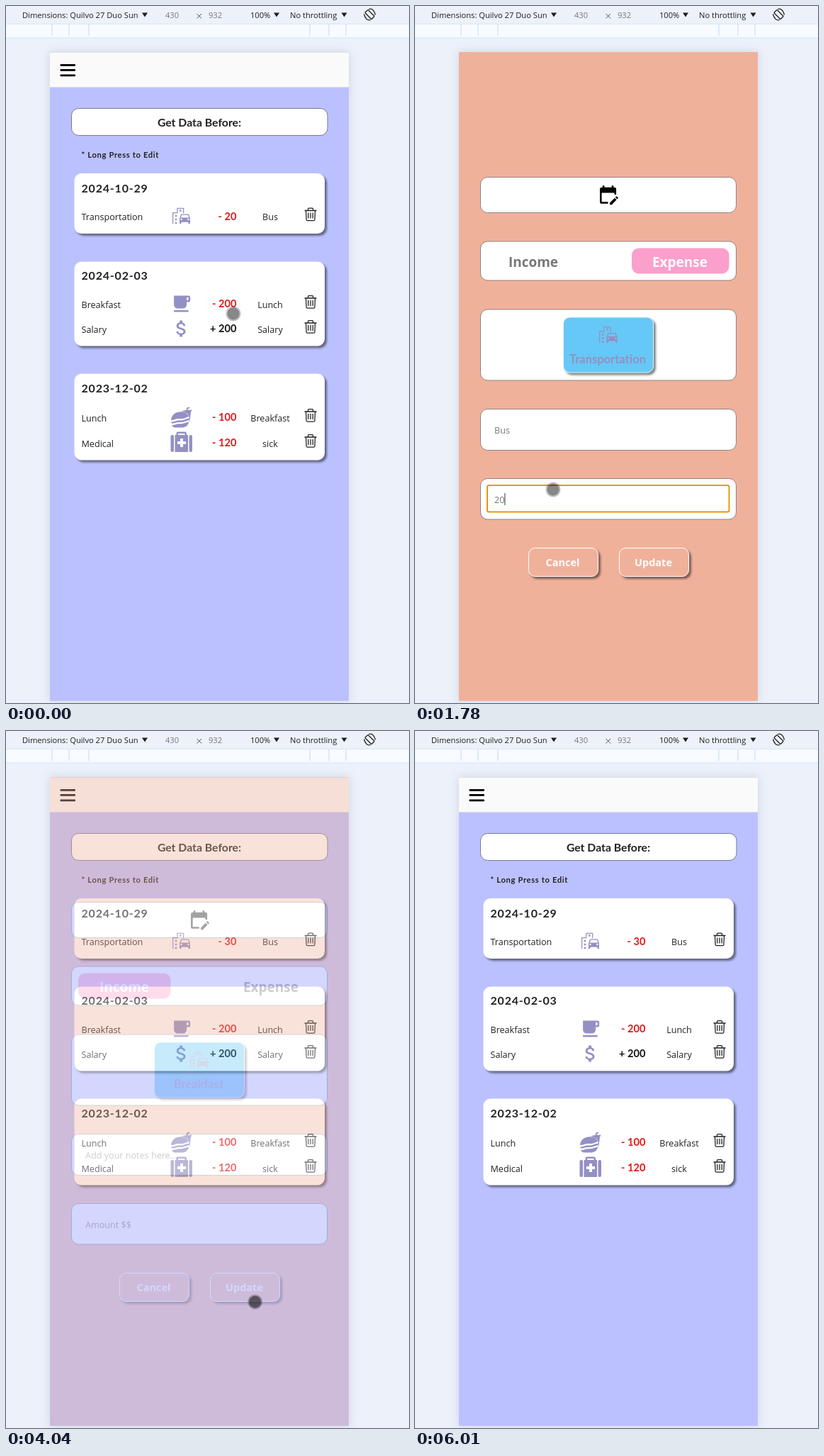
Animation of 569 by 983 pixels, one loop 6230 ms. Source, as an HTML page:

```html
<!DOCTYPE html>
<html lang="en">
<head>
<meta charset="utf-8">
<title>Expense list</title>
<style>
html, body { margin: 0; width: 100%; height: 100%; overflow: hidden; background: #ecf1fa; }
svg { display: block; width: 100vw; height: 100vh; }
text { font-family: "Open Sans", "Noto Sans", sans-serif; font-size: 12.6px; fill: #222; white-space: pre; }
.bar { font-size: 11.15px; fill: #1f1f1f; }
.dim { fill: #777; }
.date, .amt, .head, .hint, .tile { font-family: Lato, sans-serif; font-weight: 700; }
.date { font-size: 16px; letter-spacing: .8px; }
.amt { font-size: 14.6px; text-anchor: end; }
.head { font-size: 15.8px; text-anchor: middle; }
.hint { font-size: 11.2px; letter-spacing: .65px; }
.tile { font-size: 16.5px; fill: #9390c3; text-anchor: middle; }
.mid { text-anchor: middle; }
.big, .btn { font-weight: 700; text-anchor: middle; }
.big { font-size: 19px; fill: #777; }
.btn { font-size: 14.5px; fill: #fff; }
.icon { fill: #9390c3; }
.line { fill: none; stroke: #222; stroke-width: 1.3; }
.lift { filter: drop-shadow(3px 3px 1.5px rgba(0,0,0,.48)); }
</style>
</head>
<body>
<svg id="stage" viewBox="0 0 569 983" preserveAspectRatio="none"></svg>
<script>
const LOOP = 6230;
const $ = id => document.getElementById(id);

// ---------- drawing helpers ----------
const text = (x, y, s, cls = '', extra = '') => `<text x="${x}" y="${y}" class="${cls}" ${extra}>${s}</text>`;
const rect = (x, y, w, h, fill, r = 0, extra = '') =>
  `<rect x="${x}" y="${y}" width="${w}" height="${h}" rx="${r}" fill="${fill}" ${extra}/>`;
const field = (y, h) => rect(92.5, y + .5, 361, h, '#fff', 10, 'stroke="#8b8582"');
const card = (y, h) => rect(96.5, y, 353.5, h, '#fff', 10, 'class="lift"');
const icon = (x, y, d, scale = 1.28, extra = 'class="icon"') =>
  `<path transform="translate(${x} ${y}) scale(${scale})" d="${d}" ${extra}/>`;
const arrow = x => `<path d="M${x - 4} 9.5h8l-4 6z" fill="#1f1f1f"/>`;

const TRANSPORT = 'M20.57 10.66C20.43 10.26 20.05 10 19.6 10h-7.19c-.46 0-.83.26-.98.66L10 14.77v5.51c0 .38.31.72.69.72h.62c.38 0 .69-.38.69-.76V19h8v1.24c0 .38.31.76.69.76h.61c.38 0 .7-.34.7-.72v-5.51zM12.4 11h7.2l1 3h-9.2zM12 17a1 1 0 1 1 0-2 1 1 0 0 1 0 2zm8 0a1 1 0 1 1 0-2 1 1 0 0 1 0 2zM14 9h1V3H7v5H2v13h1V9h5V4h6zM5 11h2v2H5zM10 5h2v2h-2zM5 15h2v2H5zM5 19h2v2H5z';
const CUP = 'M20 3H4v10a4 4 0 0 0 4 4h6a4 4 0 0 0 4-4v-3h2a2 2 0 0 0 2-2V5a2 2 0 0 0-2-2zm0 5h-2V5h2zM4 19h16v2H4z';
const DOLLAR = 'M11.8 10.9c-2.27-.59-3-1.2-3-2.15 0-1.09 1.01-1.85 2.7-1.85 1.78 0 2.44.85 2.5 2.1h2.21c-.07-1.72-1.12-3.3-3.21-3.81V3h-3v2.16c-1.94.42-3.5 1.68-3.5 3.61 0 2.31 1.91 3.46 4.7 4.13 2.5.6 3 1.48 3 2.41 0 .69-.49 1.79-2.7 1.79-2.06 0-2.87-.92-2.98-2.1h-2.2c.12 2.19 1.76 3.42 3.68 3.83V21h3v-2.15c1.95-.37 3.5-1.5 3.5-3.55 0-2.84-2.43-3.81-4.7-4.4z';
const CALENDAR = 'M12 22H5a2 2 0 0 1-2-2V6c0-1.1.9-2 2-2h1V2h2v2h8V2h2v2h1a2 2 0 0 1 2 2v6h-2v-2H5v10h7zm10.1-5 .7-.7c.4-.4.4-1 0-1.4l-.7-.7c-.4-.4-1-.4-1.4 0l-.7.7 2.1 2.1zm-.7.7L16.1 23H14v-2.1l5.3-5.3z';
const FOOD = 'M0 18.5C1 4.500 22 3.500 25 13.500C20 15 18 17 12 16.500C7 16 4 19 0 18.500zM.5 21c5 0 7-2.500 12-2C18 19.500 20 17 25.500 16v2.500C20 20 18 22 12 21.500C7 21 5 23.500.5 23zM1.500 25.500c5 0 7-2 11-1.700C18 24 20 22 25 21c-.5 5-4 8-11 8H6c-3 0-4-1.500-4.500-3.500zM16 5.500l5.500-1 1-3.500 3.500-1 .5 1.500-2.500 1-.5 2 6-.5-1.500 3.500L26 23l-.5-9C24 9 20 7 16 6.500z';
const TRASH = 'M-8.500-5.500h17M-3.500-5.500v-2.300q0-1 1-1h5q1 0 1 1v2.300M-6.500-5.500l.6 12.700q.1 1.500 1.500 1.500h8.800q1.400 0 1.500-1.500l.6-12.700M-3.200-2.500v8M0-2.500v8M3.200-2.500v8';
const MEDICAL = rect(232.500, 605, 4.500, 24, '#9390c3', 2) + rect(258.500, 605, 4.500, 24, '#9390c3', 2) +
  '<path class="icon" fill-rule="evenodd" d="M238.500 629V605h2v-2q0-2.500 2.500-2.500h9.500q2.500 0 2.500 2.500v2h2v24zM243 605h9.500v-2H243zM246 610v4h-4v4h4v4h4v-4h4v-4h-4v-4z"/>';

const row = (y, name, art, amount, note, color = '#e0191b', id = 'r' + y) =>
  `<g id="${id}">${text(106.500, y, name)}${art}` +
  text(325.500, y - .5, amount, 'amt', `style="fill:${color}"`) + text(373, y, note, 'mid') + '</g>' +
  icon(430, y - 8, TRASH, 1, 'class="line"');

const button = (x, label) =>
  rect(x + .5, 764.500, 98, 40, '#f0b19b', 9, 'stroke="#fff" class="lift"') + text(x + 48.500, 790, label, 'btn');

// ---------- scene ----------
const chrome =
  rect(0, 0, 569, 983, '#ecf1fa') + rect(0, 25, 569, 20, '#f8fbff') +
  rect(0, 25, 569, 1, '#dbe6f8') + rect(0, 44.500, 569, 1, '#d3e3fd') +
  [65, 89, 117, 429, 456, 480].map(x => rect(x - .75, 26, 1.500, 16, '#d3e3fd')).join('') +
  text(23, 16.500, 'Dimensions: Quilvo 27 Duo Sun', 'bar') + arrow(196) +
  text(225, 16.500, '430', 'bar dim') + text(286, 16.500, '932', 'bar dim') +
  '<path d="M269.500 11l6.500 6.500m0-6.500l-6.500 6.500" stroke="#555"/>' +
  text(345, 16.500, '100%', 'bar') + arrow(382) + text(401, 16.500, 'No throttling', 'bar') + arrow(477.500) +
  '<g class="line"><rect x="-3" y="-6.500" width="6" height="13" rx="1" transform="translate(513.500 12) rotate(-45)"/>' +
  '<path d="M512 4.500q7-2 9.500 8M515 19.500q-7 2-9.500-8"/></g>' +
  rect(62, 65, 422, 915, '#bbc1fe', 0, 'style="filter:drop-shadow(0 0 7px rgba(90,100,130,.2))"');

const list =
  rect(62, 65, 422, 915, '#bbc1fe') + rect(62, 65, 422, 49.500, '#fafafa') + rect(62, 65, 422, 1, '#e2e3e6') +
  [82, 89, 96.500].map(y => rect(76.500, y, 21.500, 2.800, '#000', 1)).join('') +
  rect(92.500, 144.500, 361.500, 38, '#fff', 10, 'stroke="#777a90"') + text(273, 169.500, 'Get Data Before:', 'head') +
  text(106.500, 214, '* Long Press to Edit', 'hint') +
  card(236, 85) + card(360.500, 119) + card(518.500, 122) +
  text(106.500, 263, '2024-10-29', 'date') + text(106.500, 386, '2024-02-03', 'date') +
  text(106.500, 544.500, '2023-12-02', 'date') +
  row(302, 'Transportation', icon(232.500, 281, TRANSPORT, 1.250), '<tspan id="cost"></tspan>', 'Bus', undefined, 'pressed') +
  row(425.500, 'Breakfast', icon(232, 404.700, CUP), '- 200', 'Lunch') +
  row(460.500, 'Salary', icon(232.400, 439.700, DOLLAR), '+ 200', 'Salary', '#151515') +
  row(585.500, 'Lunch', icon(233, 565.500, FOOD, 1), '- 100', 'Breakfast') +
  row(621.500, 'Medical', MEDICAL, '- 120', 'sick');

const form =
  rect(62, 65, 422, 915, '#f0b19b') +
  field(241, 50) + field(331.500, 55) + field(427.500, 100) + field(568, 58) + field(666, 57.500) +
  icon(257.200, 250.700, CALENDAR, 1.280, '') +
  '<rect id="pick" y="341.500" height="36" rx="10" fill="#fb9fcc"/>' +
  text(167, 367.500, 'Income', 'big', 'id="income"') + text(374, 367.500, 'Expense', 'big', 'id="expense"') +
  rect(209.500, 439, 127, 78, '#66c8f6', 9, 'stroke="#e4f4fd" class="lift"') +
  icon(257.500, 448.200, TRANSPORT) + text(272, 504, '', 'tile', 'id="kind"') +
  text(112, 603, '', 'dim', 'id="note"') + text(112, 701, '', 'dim', 'id="sum"') +
  rect(102, 676, 341.500, 37.500, 'none', 2.500, 'id="focus" stroke="#e39a0c" stroke-width="2"') +
  rect(0, 687, 1, 17, '#333', 0, 'id="caret"') +
  button(160, 'Cancel') + button(288, 'Update');

$('stage').innerHTML = chrome + list + `<g id="form">${form}</g>` +
  '<g id="touch"><circle r="10.500" opacity=".25"/><circle id="core" r="8.500"/></g>';

// ---------- motion ----------
const clamp = v => Math.min(1, Math.max(0, v));
const bez = (s, a, b) => 3 * s * (1 - s) * (1 - s) * a + 3 * s * s * (1 - s) * b + s * s * s;

// cubic-bezier(.25, .1, .25, 1)
function ease(x) {
  let lo = 0, hi = 1;
  for (let i = 0; i < 24; i++) {
    const m = (lo + hi) / 2;
    if (bez(m, .25, .25) < x) lo = m; else hi = m;
  }
  return bez(lo, .1, 1);
}

// time, x, y
const PATH = [
  [0, 321, 434], [40, 321, 434], [190, 324, 360], [330, 327, 301], [950, 327, 301], [1150, 285, 440],
  [1390, 220, 608], [1650, 195, 682], [3290, 195, 682], [3450, 240, 735], [3580, 286, 778],
  [3800, 352, 805], [4500, 351, 805.500], [4600, 358, 790], [4760, 415, 640], [4910, 426, 470],
  [5150, 326, 285], [5250, 326, 294], [5420, 302, 306], [5600, 265, 274], [5760, 272, 287],
  [5820, 272, 287], [5880, 370, 620], [5950, 458, 897], [LOOP, 458, 897]
];
function touchAt(t) {
  const i = Math.max(1, PATH.findIndex(p => p[0] > t));
  const [a, b] = [PATH[i - 1], PATH[i]];
  const k = clamp((t - a[0]) / (b[0] - a[0]));
  return [a[1] + (b[1] - a[1]) * k, a[2] + (b[2] - a[2]) * k];
}

const TYPING = [[0, '20'], [2340, '2'], [2500, ''], [2810, '3'], [2910, '30']];
const within = (t, a, b) => t >= a && t < b;
const show = (id, on) => $(id).setAttribute('opacity', +on);

function draw(t) {
  const saved = t >= 3930;
  show('form', saved ? 1 - ease(clamp((t - 3930) / 300)) : ease(clamp((t - 785) / 500)));
  show('pressed', saved ? 1 : 1 - .5 * clamp((t - 330) / 240));
  $('cost').textContent = saved ? '- 30' : '- 20';

  $('pick').setAttribute('x', saved ? 102 : 306);
  $('pick').setAttribute('width', saved ? 130.500 : 137.500);
  $('income').style.fill = saved ? '#fff' : '#777';
  $('expense').style.fill = saved ? '#777' : '#fff';
  $('kind').textContent = saved ? 'Breakfast' : 'Transportation';
  $('note').textContent = saved ? 'Add your notes here...' : 'Bus';

  const value = saved ? '' : TYPING.filter(k => k[0] <= t).pop()[1];
  $('sum').textContent = value || 'Amount $$';
  show('focus', within(t, 1700, 3930));
  show('caret', within(t, 1700, 3290));
  $('caret').setAttribute('x', 112 + value.length * 7.200);

  const [x, y] = touchAt(t);
  $('touch').setAttribute('transform', `translate(${x} ${y})`);
  show('touch', !within(t, 2180, 3290) && t < 5990);
  const held = within(t, 330, 980) || within(t, 3850, 4100);
  $('core').setAttribute('opacity', held ? .42 : .29);
}

function tick() {
  draw(performance.now() % LOOP);
  requestAnimationFrame(tick);
}
tick();
</script>
</body>
</html>
```
